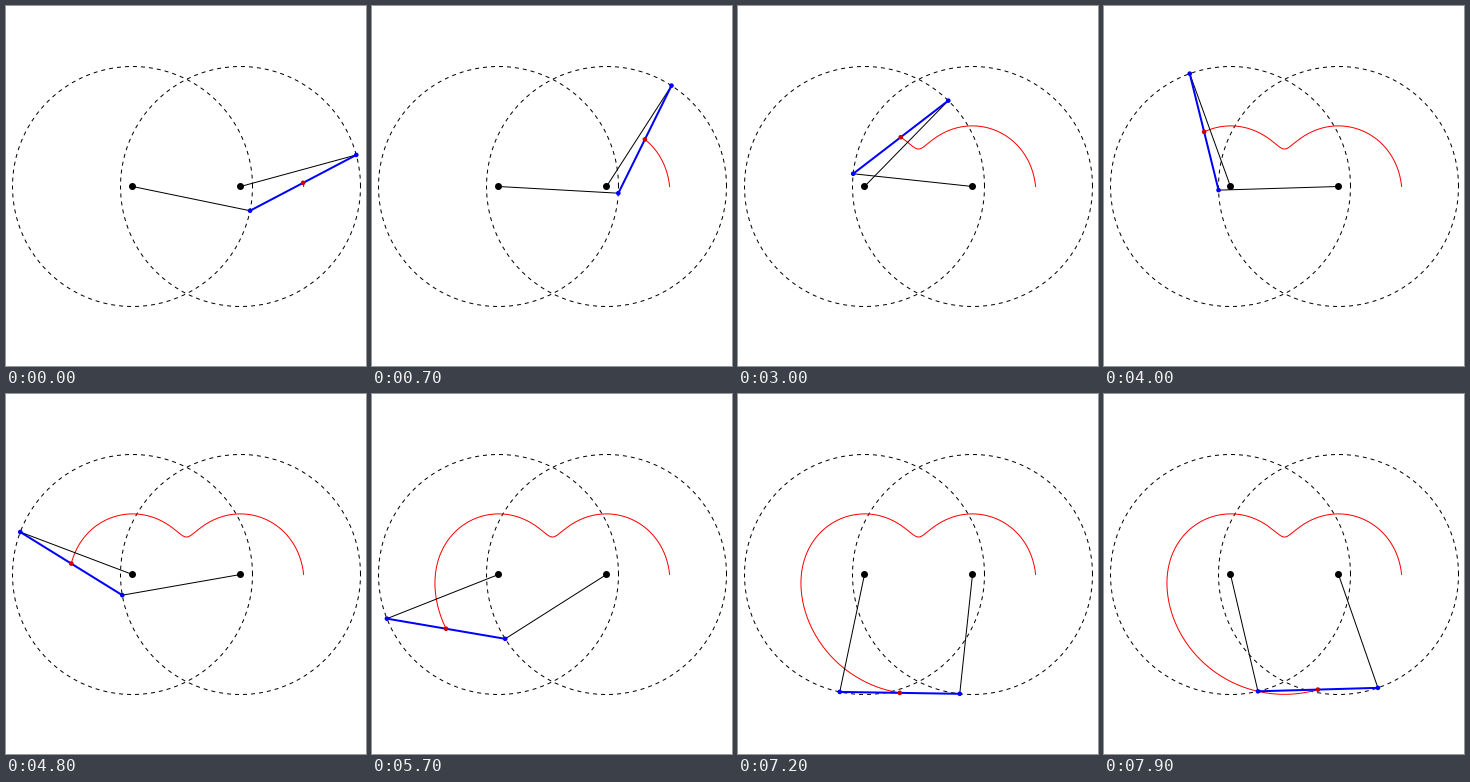
A matplotlib script that plays this animation: 360x360 px, repeating every 8 s.

```python
import numpy as np
import matplotlib.pyplot as plt
from matplotlib.animation import FuncAnimation
from matplotlib.patches import Circle

SIZE, FRAMES, STEP_MS = 360, 80, 100
RADIUS, GAP, ROD = 120, 108, 120      # cranks, pivot distance, coupler
MID = 180.5
LEFT, RIGHT = MID - GAP / 2, MID + GAP / 2

fig = plt.figure(figsize=(SIZE / 72, SIZE / 72), dpi=72, facecolor="white")
ax = fig.add_axes([0, 0, 1, 1])
ax.set_xlim(0, SIZE)
ax.set_ylim(SIZE, 0)
ax.axis("off")


def linkage(phi):
    """Both crank ends for a mean crank angle phi, with y pointing down."""
    rise = GAP * np.sin(phi)
    half = np.arcsin((rise + np.sqrt(rise**2 + ROD**2 - GAP**2)) / (2 * RADIUS))

    def end(pivot, angle):
        return np.array([pivot + RADIUS * np.cos(angle),
                         MID - RADIUS * np.sin(angle)])

    return end(LEFT, phi - half), end(RIGHT, phi + half)


def line(color, width, z):
    return ax.plot([], [], color=color, lw=width, zorder=z, snap=False)[0]


def dot(x, y, radius, color, z):
    return ax.add_patch(Circle((x, y), radius, fc=color, ec="none", zorder=z))


turn = np.linspace(0, 2 * np.pi, 721)
for pivot in (LEFT, RIGHT):
    ax.plot(pivot + RADIUS * np.cos(turn), MID - RADIUS * np.sin(turn),
            color="black", lw=1, dashes=(4, 4), dash_capstyle="butt", zorder=1)
    dot(pivot, MID, 3.5, "black", 4)

trace = line("red", 1, 2)
arms = [line("black", 1, 3) for _ in range(2)]
rod = line("blue", 2, 5)
ends = [dot(0, 0, 2.3, "blue", 6) for _ in range(2)]
pen = dot(0, 0, 2.3, "#cc0000", 7)


def draw(i):
    phi = 2 * np.pi * (i + 0.5) / 100
    a, b = linkage(phi)
    for arm, tip, pivot, p in zip(arms, ends, (LEFT, RIGHT), (a, b)):
        arm.set_data([pivot, p[0]], [MID, p[1]])
        tip.center = tuple(p)
    rod.set_data([a[0], b[0]], [a[1], b[1]])
    pen.center = tuple((a + b) / 2)
    pa, pb = linkage(np.linspace(0, phi, 4 * i + 4))
    trace.set_data(*((pa + pb) / 2))
    return [trace, *arms, rod, *ends, pen]


anim = FuncAnimation(fig, draw, frames=FRAMES, interval=STEP_MS,
                     repeat=True, repeat_delay=0, blit=False)
plt.show()
```
